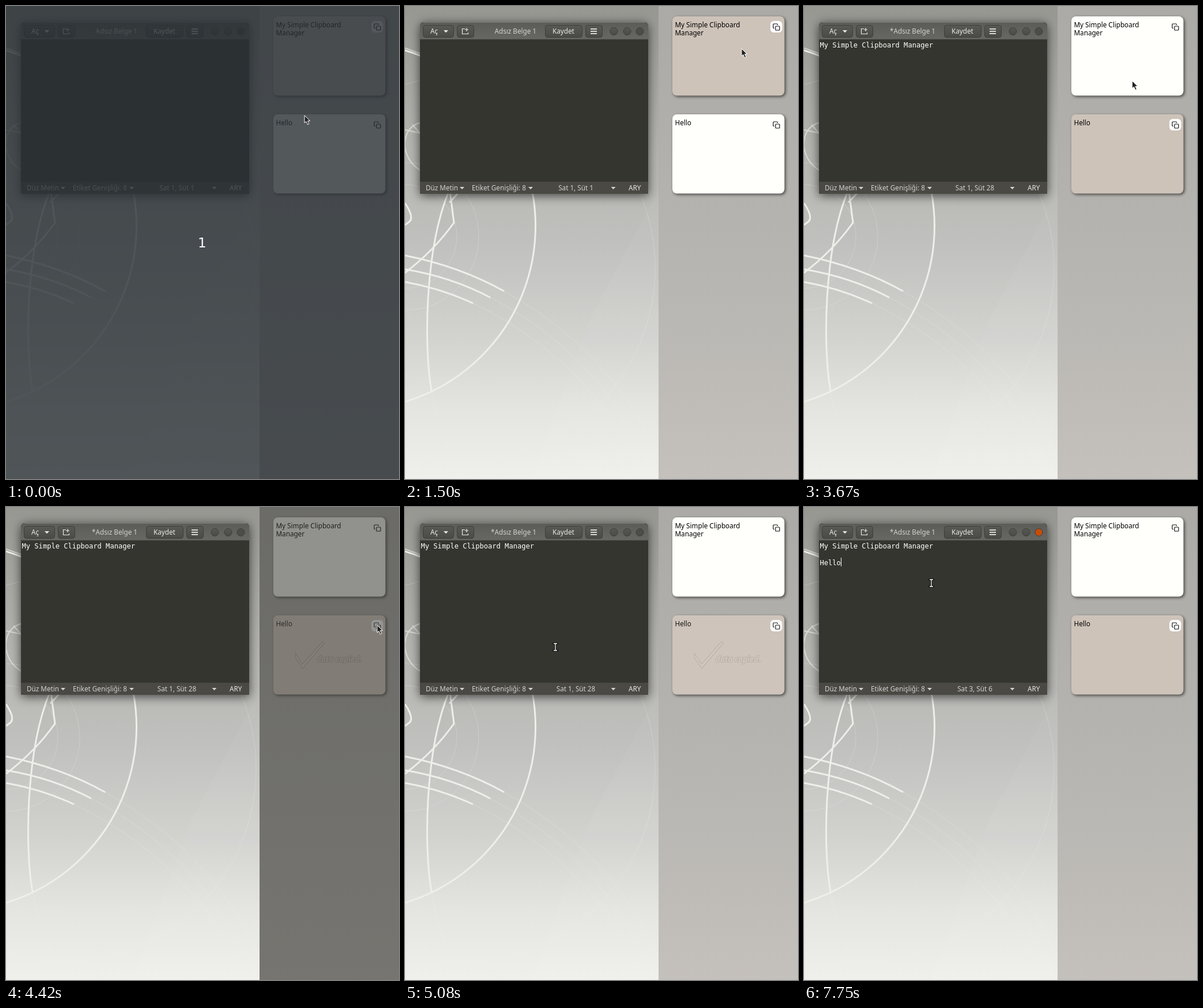
Write an HTML page that moves like this. It is 682 px wide and 821 px high and loops after 8 s.

```html
<!DOCTYPE html>
<html lang="tr">
<head>
<meta charset="utf-8">
<style>
html, body { margin: 0; width: 100%; height: 100%; overflow: hidden; }
svg { display: block; width: 682px; height: 821px; font: 11.7px "Noto Sans", "Open Sans", sans-serif; }
.line { fill: none; stroke: #eeefea; stroke-width: 3; }
.edge { stroke-width: 2; opacity: .65; }
.thin { fill: none; stroke: #f4f4f0; stroke-width: 1; opacity: .25; }
.btn { fill: url(#btn); stroke: #3d3e39; }
.light { fill: #e9e9e5; }
.soft { fill: #d3d3cf; }
.mono { font: 12.1px "DejaVu Sans Mono", monospace; fill: #fff; }
.shade { filter: drop-shadow(2px 2px 2.5px #0009); }
.icon { fill: none; stroke-width: 1.2; }
.done { font-size: 13.4px; font-weight: bold; font-style: italic; }
</style>
</head>
<body>
<svg viewBox="0 0 682 821">
<defs>
  <linearGradient id="wall" x2="0" y2="1">
    <stop offset="0" stop-color="#979792"/><stop offset=".3" stop-color="#b4b4b0"/>
    <stop offset=".5" stop-color="#c0c1be"/><stop offset=".7" stop-color="#d2d3cf"/>
    <stop offset=".85" stop-color="#e4e5e0"/><stop offset="1" stop-color="#eff0eb"/>
  </linearGradient>
  <linearGradient id="side" x2="0" y2="1">
    <stop offset="0" stop-color="#abaaa6"/><stop offset=".5" stop-color="#b5b4b0"/>
    <stop offset="1" stop-color="#c4c0bb"/>
  </linearGradient>
  <linearGradient id="bar" x2="0" y2="1">
    <stop offset="0" stop-color="#5b5c57"/><stop offset="1" stop-color="#676863"/>
  </linearGradient>
  <linearGradient id="btn" x2="0" y2="1">
    <stop offset="0" stop-color="#585954"/><stop offset="1" stop-color="#4a4b46"/>
  </linearGradient>
  <path id="down" d="M-4-2H4L0 2.3Z"/>
  <path id="stem" d="M-3-6H3M-3 6H3M0-6V6"/>
  <g id="copy" class="icon" stroke="#111">
    <rect x="9" y="9" width="7" height="7" rx="1"/>
    <path d="M7 12.5H6a1 1 0 0 1-1-1V6a1 1 0 0 1 1-1h5.5a1 1 0 0 1 1 1v1"/>
  </g>
</defs>

<!-- wallpaper -->
<rect width="440" height="821" fill="url(#wall)"/>
<path d="M440 320V821H220L320 545Z" fill="#fff" opacity=".03"/>
<g class="thin">
  <circle cx="100" cy="455" r="334"/>
  <circle cx="0" cy="400" r="90"/><circle cx="0" cy="400" r="128"/>
  <path d="M118 516Q315 610 412 808M148 506Q338 604 424 800M172 495Q360 600 440 782M46 668Q56 730 84 790"/>
</g>
<g class="line">
  <circle cx="-92" cy="382" r="318.5"/>
  <path d="M0 433Q95 452 172 495M0 457Q80 470 148 506M0 479Q62 490 118 516"/>
  <path d="M46 668C32 590 35 420 76 322M78 322L85 376Q50 425 0 463M93 324L77 341"/>
  <path d="M0 342Q16 366 8 374L0 380"/>
  <path class="edge" d="M0 73L28 83M28 202Q-2 210 0 245Q4 272 28 286M0 215L28 221M13 206L28 223"/>
</g>
<rect x="440" width="242" height="821" fill="url(#side)"/>

<!-- editor window -->
<path d="M26 326V35q0-7 7-7H415q7 0 7 7V326Z" fill="#353530" style="filter:drop-shadow(0 3px 9px #000a)"/>
<path d="M26 58V35q0-7 7-7H415q7 0 7 7V58Z" fill="url(#bar)"/>
<path d="M32 28.5H416" stroke="#777872"/>
<path d="M26 58H422" stroke="#42433e"/>
<rect x="26" y="305" width="396" height="21" fill="#4a4944"/>
<g class="btn">
  <rect x="31.5" y="33.5" width="53" height="21" rx="4"/>
  <rect x="90.5" y="33.5" width="29" height="21" rx="4"/>
  <rect x="243.5" y="33.5" width="64" height="21" rx="4"/>
  <rect x="313.5" y="33.5" width="29" height="21" rx="4"/>
  <circle cx="362.5" cy="44" r="6.5"/><circle cx="385.5" cy="44" r="6.5"/>
</g>
<circle id="close" cx="407.5" cy="44" r="6.5" stroke="#3d3e39"/>
<g class="light">
  <text x="44" y="48">Aç</text><text x="256" y="48">Kaydet</text>
  <use href="#down" x="71" y="44"/>
  <path d="M322 39h11v1.7h-11zm0 4h11v1.7h-11zm0 4h11v1.7h-11z"/>
  <path class="icon" stroke="#e9e9e5" d="M104 39.5H99.5V48.5H109.5V46M107 38v6M104 41h6"/>
  <text x="388" y="320">ARY</text>
</g>
<g class="soft">
  <text id="title" x="228" y="48" text-anchor="end"></text>
  <text x="36" y="320">Düz Metin</text><use href="#down" x="99" y="316"/>
  <text x="116" y="320">Etiket Genişliği: 8</text><use href="#down" x="218" y="316"/>
  <text id="place" x="296.5" y="320" text-anchor="middle"></text><use href="#down" x="361.5" y="316"/>
</g>
<text id="first" class="mono" x="27.5" y="71.5">My Simple Clipboard Manager</text>
<text id="third" class="mono" x="27.5" y="100.5">Hello</text>
<rect id="caret" width="1" height="15" fill="#fff"/>

<!-- clipboard cards -->
<g class="shade">
  <rect id="card0" x="464" y="18" width="194.5" height="137.5" rx="8"/>
  <rect id="card1" x="464" y="188" width="194.5" height="137.5" rx="8"/>
</g>
<rect id="copy0" x="634" y="26" width="20.5" height="20" rx="6" fill="#fff"/>
<rect id="copy1" x="634" y="196" width="20.5" height="20" rx="6" fill="#fff"/>
<use href="#copy" x="634" y="26"/><use href="#copy" x="634" y="196"/>
<text x="468.5" y="37">My Simple Clipboard</text><text x="468.5" y="51">Manager</text>
<text x="468.5" y="207">Hello</text>
<rect id="dim" x="440" width="242" height="821" fill="#393936" opacity=".554"/>
<g id="notice">
  <rect x="464" y="188" width="194.5" height="137.5" rx="8" fill="#d2d2d0"/>
  <path d="M502.5 254L514.5 273L549.5 233.5L552.5 236L515 280L502.5 262Z" fill="#fff" stroke="#111" stroke-width="1.2"/>
  <text class="done" x="539" y="268.5" fill="#fff" stroke="#111" stroke-width="2.2" paint-order="stroke">data copied.</text>
</g>

<g id="intro">
  <rect width="682" height="821" fill="#292f34" opacity=".8"/>
  <text x="340.3" y="419" text-anchor="middle" fill="#fff" style="font:23px 'DejaVu Sans',sans-serif">1</text>
</g>

<!-- pointers -->
<path id="arrow" d="M0 0V13L3 10.3L5.5 15.8L7.9 14.7L5.5 9.4H9.6Z" fill="#222" stroke="#fff"/>
<g id="beam">
  <use href="#stem" stroke="#111" stroke-width="3.4" stroke-linecap="square"/>
  <use href="#stem" stroke="#fff" stroke-width="1.3"/>
</g>
</svg>
<script>
const $ = id => document.getElementById(id);
const show = (id, on) => $(id).style.display = on ? '' : 'none';
const clamp = v => Math.max(0, Math.min(1, v));
const RATE = 12; // picture steps per second

// pointer moves: first step, last step, goal x, goal y
const moves = [
  [0, 1, 261, 155], [3, 5, 223, 161], [7, 10, 194, 42], [11, 14, 584, 74],
  [20, 23, 256, 162], [24, 29, 281, 228], [30, 34, 518, 258], [40, 44, 569.5, 130],
  [44, 45, 498, 143], [46, 50, 644, 205], [58, 59, 541, 252], [59, 61, 261, 243],
  [63, 69, 205, 154], [86, 88, 249, 125], [88, 91, 221, 132]
];

function pointer(step) {
  let x = 518, y = 190;
  for (const [from, to, goalX, goalY] of moves) {
    const ease = 1 - (1 - clamp((step - from) / (to - from))) ** 2;
    x += (goalX - x) * ease;
    y += (goalY - y) * ease;
  }
  return [x, y];
}

function draw(step) {
  const [x, y] = pointer(step);
  const inText = x < 422 && y > 58 && y < 305;
  show('arrow', !inText);
  show('beam', inText);
  for (const id of ['arrow', 'beam']) $(id).setAttribute('transform', `translate(${x} ${y})`);
  show('intro', step < 1);

  const pasted = step >= 27, hello = step >= 79, focus = step >= 68;
  const row = 1 + (step >= 75) + (step >= 76);
  const col = hello ? 6 : row > 1 || !pasted ? 1 : 28;
  $('title').textContent = (pasted ? '*' : '') + 'Adsız Belge 1';
  $('place').textContent = `Sat ${row}, Süt ${col}`;
  show('first', pasted);
  show('third', hello);
  show('caret', focus);
  $('caret').setAttribute('x', Math.round(27.5 + (col - 1) * 7.28));
  $('caret').setAttribute('y', 59 + (row - 1) * 14.5);
  $('close').setAttribute('fill', focus ? '#c64d0a' : '#4c4d48');

  const chosen = step < 37 ? 0 : 1;
  for (const i of [0, 1]) {
    $('card' + i).setAttribute('fill', i === chosen ? '#cec3b9' : '#fffffb');
    show('copy' + i, i === chosen);
  }
  show('dim', step >= 52 && step < 61);
  $('notice').setAttribute('opacity', Math.min(clamp((step - 52.8) / 3), clamp((61.2 - step) / 2.2)));
}

function tick() {
  const time = performance.now() % 8000;
  draw(Math.floor((time + 5) / 1000 * RATE));
  requestAnimationFrame(tick);
}
tick();
</script>
</body>
</html>
```
